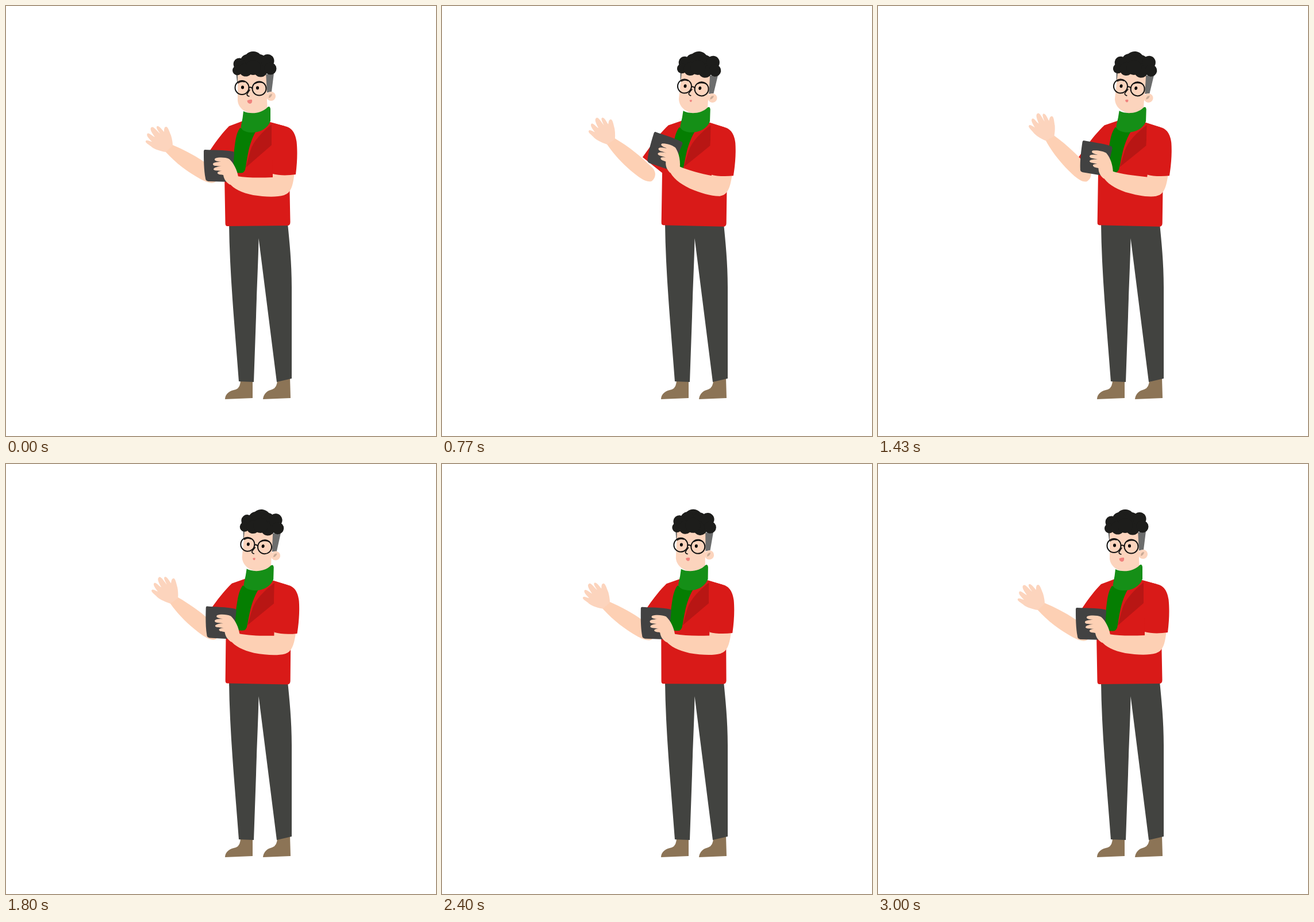
These frames come from a looping animation (748x748 px, 3.03 s). An HTML page:

```html
<!DOCTYPE html>
<html lang="en">
<head>
<meta charset="utf-8">
<title>Presenter</title>
<style>
html, body { margin: 0; width: 100%; height: 100%; overflow: hidden; background: #fff; }
svg { display: block; width: 100vw; height: 100vh; }
.skin { fill: #fdd0b4; }
.pale { fill: #fcd4bd; }
.red { fill: #d91a18; }
.line { fill: none; stroke: #111; stroke-linecap: round; stroke-linejoin: round; }
</style>
</head>
<body>
<svg viewBox="0 0 748 748">
  <g fill="#8c7456">
    <path d="M408 650 L429 651 L429 682 L381 684 C381 674 390 669 400 667 Q408 664 408 650Z"/>
    <path d="M472 650 L494 647 L495 682 L447 684 C448 674 455 669 463 667 Q472 664 472 650Z"/>
  </g>
  <path fill="#424340" d="M388 378 H490 C493 410 497 445 497 490 V648 L471 654 L439.500 404 C439 440 436 500 435 540 L431 654 L405 653 C399 570 389 470 388 378Z"/>

  <g id="body">
    <path class="red" d="M412 200 L388 209 C378 219 367 233 357 248 L345 266 L380 292 L381.500 378 Q381.500 383 385 383 L489 382 Q494.500 382 494.500 376 L493 300 L500 230 L485 209 L460 202Z"/>
    <path fill="#b81614" d="M462 206 C445 220 430 235 425 252 L417 281 L462 242Z"/>
    <path fill="#057e02" d="M407 212 C400 222 399 235 397 250 L393 286 Q400 292 412 290 Q414 289 416 285 C420 265 421 243 434 219Z"/>

    <g id="head">
      <path fill="#6c6d6d" d="M400 116 H408 V134 L402 132Z M450 119 L466 117 L462 149 L452 151Z"/>
      <circle class="pale" cx="461" cy="157" r="8"/>
      <path class="pale" d="M403 114 L403 165 C405 179 417 186 430 187 L432 200 H456 L454 165 V151 L452 114Z"/>
      <path d="M457 160 Q457 153 463 153 Q462 159 457 160Z" fill="#c8aa96"/>
      <g id="hair" fill="#1d1d1b"></g>
      <g class="line" stroke-width="2">
        <circle cx="410.500" cy="142" r="12"/>
        <circle cx="440.500" cy="143.500" r="12"/>
        <path d="M422.500 142 Q425 140 428.500 143"/>
        <path stroke-width="1.600" d="M404 134 Q409 130 415 132 M433 135 Q440 131 448 134 M424 146 Q421 150 419 154 Q420 157 423 157"/>
      </g>
      <ellipse cx="411.500" cy="141.500" rx="2.500" ry="3"/>
      <ellipse cx="437.500" cy="142.500" rx="2.500" ry="3"/>
      <path id="mouth" fill="#f0827d" d="M-4.500 -1.500 Q0 -4 4 -3 Q5 4 0 4 Q-4 3 -4.500 -1.500Z"/>
    </g>

    <path fill="#158f17" d="M413 183 C425 189 445 187 455 176 Q459 173 460 179 L460 200 C455 214 440 221 425 220 C414 219 407 214 409 208 Q412 195 413 183Z"/>

    <g id="waveArm">
      <path class="skin" d="M288 241 C305 248 325 258 343 270 L362 283 C370 290 370 300 364 306 C358 310 348 306 340 302 C315 288 295 273 277 253Z"/>
      <path class="pale" d="M278 254 C266 252 256 248 252 244 C247 240 242 238 243 235 C244 232 250 235 254 236 C249 231 243 225 246 222 C249 220 254 226 259 228 C254 221 249 214 253 211 C256 208 263 218 268 222 C264 216 260 211 263 209 C267 208 272 216 275 219 C275 214 275 210 279 210 C282 211 284 218 287 225 C289 232 290 238 290 243Z"/>
    </g>

    <path class="skin" d="M466 288 H502 C500 308 497 322 488 327 C478 332 466 326 466 310Z"/>
    <g id="holdArm">
      <path id="tablet" fill="#424242" d="M346 250 C360 251 380 250 394 253 Q397 253 397 257 L393 306 L352 305 Q347 304 347 300 C344 285 344 265 344 253 Q344 250 346 250Z"/>
      <path class="skin" d="M388 308 C396 318 410 325 430 329 C450 332 470 333 484 329 C491 325 495 315 495 304 L464 290 V298 C440 299 420 299 402 296Z"/>
      <path class="skin" d="M404 297 C402 285 396 273 388 266 C381 263 370 263 364 265 C361 268 364 270 374 271 C368 271 360 272 360 275 C360 279 367 278 375 279 C369 279 361 281 361 284 C362 287 368 286 376 287 C371 287 367 289 368 291 C370 294 375 293 378 294 C379 301 383 307 390 311Z"/>
    </g>
    <path class="red" d="M464 292 C475 295 490 295 504 293 C507 270 507 250 505.500 236 C503 218 495 211 485 209 L462 203 L462 242Z"/>
  </g>
</svg>
<script>
const LOOP = 3030, FRAME = 1000 / 30;
const el = id => document.getElementById(id);
const clamp = x => Math.max(0, Math.min(1, x));

// Rises over [a, b], holds, then falls over [c, d].
const plateau = (t, a, b, c, d) => Math.min(clamp((t - a) / (b - a)), clamp((d - t) / (d - c)));
const rotate = (deg, x, y) => `rotate(${deg} ${x} ${y})`;
const place = (id, transform) => el(id).setAttribute("transform", transform);

const curls = [
  [430, 96, 17], [420, 96, 12], [441, 96, 12], [406, 101, 10.5], [402.500, 112, 8.500],
  [417, 111, 11.500], [443, 111.500, 12], [455, 95.500, 11.500], [460, 109, 10.500], [430, 107, 13]
];
el("hair").innerHTML = curls.map(([x, y, r]) => `<circle cx="${x}" cy="${y}" r="${r}"/>`).join("");

function draw(t) {
  const lean = plateau(t, 0, 640, 1600, 3000);
  const lift = plateau(t, 0, 680, 1000, 1800);
  const wave = t < 2000 ? 1 - Math.abs((t % 1000) / 500 - 1) : 0;
  const talk = (1 + Math.cos(t * 14 * 2 * Math.PI / 3000)) / 2;

  place("body", rotate(1.9 * lean, 438, 382));
  place("head", rotate(4.5 * lean, 435, 185));
  place("waveArm", rotate(13.3 * wave, 355, 293));
  place("holdArm", `translate(${3 * lift * lift} 0) ` + rotate(12.3 * lift, 480, 305));
  place("tablet", rotate(3 * lift * lift, 382, 284));
  place("mouth", `translate(424 166) scale(${0.45 + 0.55 * talk} ${0.5 + 0.5 * talk})`);
}

const start = performance.now();
function tick() {
  const t = (performance.now() - start) % LOOP;
  // Frames start on whole hundredths of a second, up to 4 ms early.
  draw(Math.floor((t + 4) / FRAME) * FRAME % (LOOP - 1));
  requestAnimationFrame(tick);
}
tick();
</script>
</body>
</html>
```
